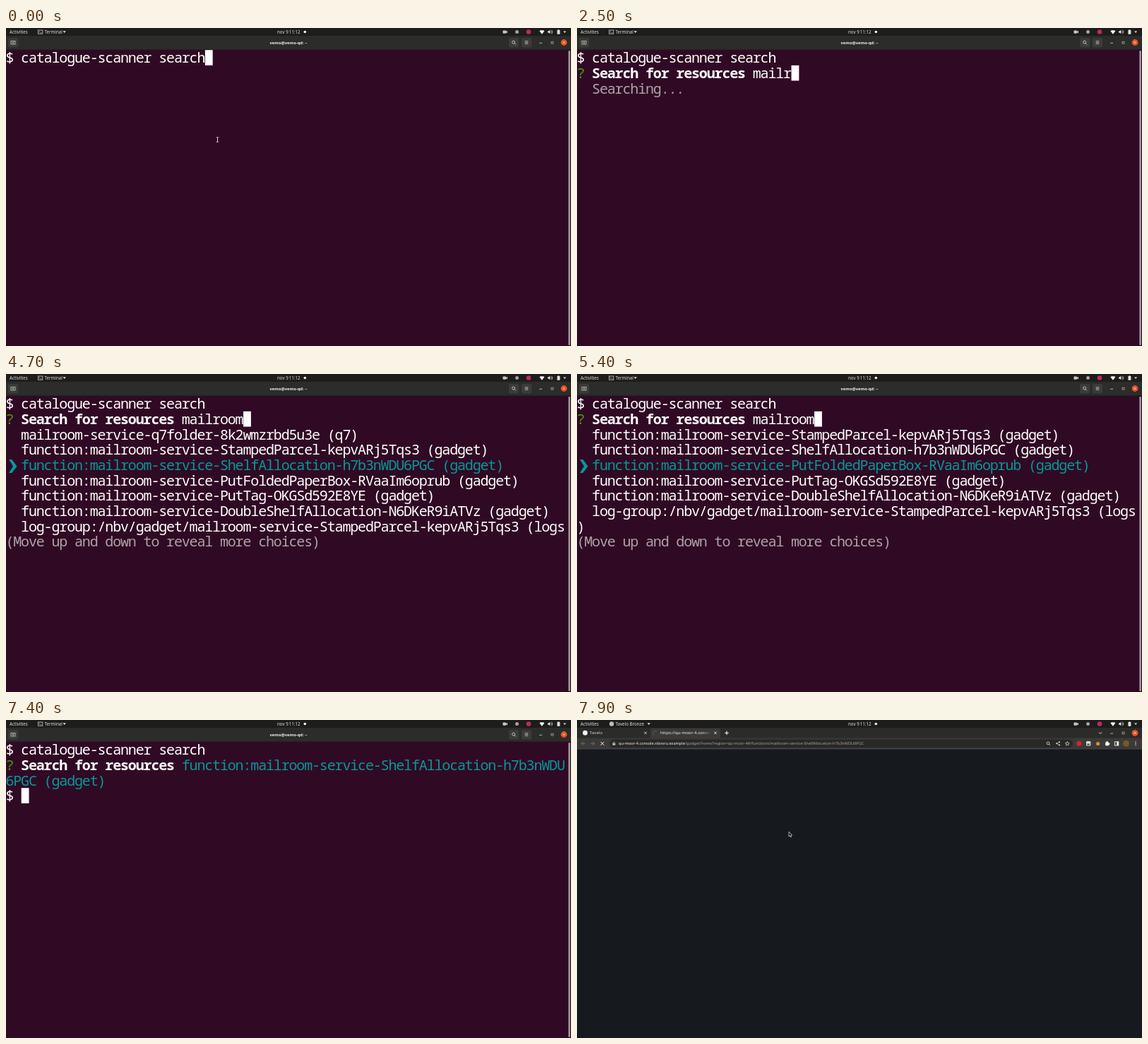
Write an HTML page with a canvas that moves like this. It is 800x450 px and loops after 8 s.

```html
<!DOCTYPE html>
<html lang="en">
<head>
<meta charset="utf-8">
<title>Terminal search</title>
<style>
html, body { margin: 0; width: 100%; height: 100%; overflow: hidden; background: #300a24; }
canvas { display: block; width: 800px; height: 450px; }
</style>
</head>
<body>
<canvas id="stage" width="800" height="450"></canvas>
<script>
const ctx = document.getElementById('stage').getContext('2d');
const LOOP = 8000, BLINK = 600, BROWSER_AT = 7600;
const CELL = 10.84, ROW = 21.67, TOP = 31.2, COLS = 73, PAGE = 7;
const WHITE = '#ffffff', DIM = '#aca2a8', CYAN = '#06989a', GREEN = '#4e9a06', ICON = '#dededc';
const SANS = '"Noto Sans", "Open Sans", sans-serif';
const MONO = '"Noto Sans Mono", "DejaVu Sans Mono", monospace';

const COMMAND = 'catalogue-scanner search';
const QUERY = 'mailroom';
const TYPED_AT = [1800, 1900, 2100, 2300, 2500, 2600, 2700, 2800];
const MOVES = [[4100, 1], [4700, 2], [5300, 3], [6000, 2]];
const KEYS = [0, 100, ...TYPED_AT, ...MOVES.map(m => m[0]), 7400];
const PICKED = 'mailroom-service-ShelfAllocation-h7b3nWDU6PGC';
const RESULTS = [
  'mailroom-service-q7folder-8k2wmzrbd5u3e (q7)',
  'function:mailroom-service-StampedParcel-kepvARj5Tqs3 (gadget)',
  `function:${PICKED} (gadget)`,
  'function:mailroom-service-PutFoldedPaperBox-RVaaIm6oprub (gadget)',
  'function:mailroom-service-PutTag-OKGSd592E8YE (gadget)',
  'function:mailroom-service-DoubleShelfAllocation-N6DKeR9iATVz (gadget)',
  'log-group:/nbv/gadget/mailroom-service-StampedParcel-kepvARj5Tqs3 (logs)'
];
const HOST = 'qu-moor-4.console.nbvoru.example';
const PATH = `/gadget/home?region=qu-moor-4#/functions/${PICKED}`;

// Drawing helpers
function rect(x, y, w, h, color, radius = 0) {
  ctx.fillStyle = color;
  ctx.beginPath();
  ctx.roundRect(x, y, w, h, radius);
  ctx.fill();
}

function dot(x, y, r, color) {
  ctx.fillStyle = color;
  ctx.beginPath();
  ctx.arc(x, y, r, 0, Math.PI * 2);
  ctx.fill();
}

function ring(x, y, r, color, width = 0.9, from = 0, to = Math.PI * 2) {
  ctx.strokeStyle = color;
  ctx.lineWidth = width;
  ctx.beginPath();
  ctx.arc(x, y, r, from, to);
  ctx.stroke();
}

function trace(points) {
  ctx.beginPath();
  for (let i = 0; i < points.length; i += 2) ctx.lineTo(points[i], points[i + 1]);
}

function line(color, width, ...points) {
  ctx.strokeStyle = color;
  ctx.lineWidth = width;
  trace(points);
  ctx.stroke();
}

function shape(color, ...points) {
  ctx.fillStyle = color;
  trace(points);
  ctx.fill();
}

function cross(x, y, r, color, width = 1) {
  line(color, width, x - r, y - r, x + r, y + r);
  line(color, width, x - r, y + r, x + r, y - r);
}

function label(text, x, y, size, color = ICON, weight = 400, align = 'left') {
  ctx.font = `${weight} ${size}px ${SANS}`;
  ctx.fillStyle = color;
  ctx.textAlign = align;
  ctx.fillText(text, x, y);
  return ctx.measureText(text).width;
}

function cells(text, col, row, color = WHITE, weight = 400) {
  ctx.font = `${weight} 20px ${MONO}`;
  ctx.fillStyle = color;
  ctx.textAlign = 'center';
  [...text].forEach((ch, i) => ctx.fillText(ch, (col + i + 0.5) * CELL, TOP + row * ROW + 18));
}

function chevron(row) {
  const y = TOP + row * ROW;
  shape(CYAN, 4, y + 3, 8.4, y + 3, 15.5, y + 12.5, 8.4, y + 22, 4, y + 22, 10, y + 12.5);
}

// Desktop panel shared by both windows
function panel(app, inBrowser) {
  rect(0, 0, 800, 11, '#1d1d1b');
  label('Activities', 5, 7.9, 6.2);
  if (inBrowser) {
    dot(49, 5.5, 3.2, '#bcbcba');
  } else {
    ctx.strokeStyle = ICON;
    ctx.lineWidth = 0.7;
    ctx.strokeRect(45.5, 3, 6.3, 5.2);
    line(ICON, 0.7, 46.8, 4.4, 48, 5.4, 46.8, 6.4);
    line(ICON, 0.7, 48.7, 6.7, 50.3, 6.7);
  }
  const end = inBrowser ? 99.5 : 80.5;
  label(app, 54.5, 7.9, 6.2);
  shape(ICON, end, 4.3, end + 4.4, 4.3, end + 2.2, 7);
  label('nov 9', 384, 7.9, 6.2);
  label('11:12', 416.5, 7.9, 6.2, ICON, 400, 'right');
  dot(423.3, 5.5, 1.8, '#f5f5f5');

  rect(703.5, 3.5, 4.5, 4.2, '#cfc4c4', 0.7);
  shape('#cfc4c4', 708, 5, 710, 3.8, 710, 7.5, 708, 6.2);
  dot(723.5, 5.5, 2.5, '#aaa0a3');
  dot(740, 5.5, 3.3, '#b92a68');
  shape('#f2f2f2', 755.3, 4.2, 757, 3.2, 760.8, 3.2, 762.4, 4.2, 758.9, 8.7);
  shape('#f2f2f2', 767, 4.5, 768.5, 4.5, 770.3, 2.8, 770.3, 8.2, 768.5, 6.6, 767, 6.6);
  ring(770.5, 5.5, 1.8, ICON, 0.7, -1, 1);
  ring(770.5, 5.5, 3.3, ICON, 0.7, -1, 1);
  rect(781.6, 2.2, 1.6, 1, ICON);
  rect(780.4, 3, 4, 5.7, ICON, 0.5);
  shape(ICON, 789, 4.4, 793.2, 4.4, 791.1, 7);
}

function windowButtons(y) {
  line(ICON, 0.8, 755.2, y + 0.8, 759, y + 0.8);
  ctx.strokeStyle = '#b8b8b6';
  ctx.lineWidth = 0.7;
  ctx.strokeRect(772, y - 1.2, 3, 2.8);
  dot(790, y, 4.4, '#e95420');
  cross(790, y, 1.4, WHITE, 0.7);
}

function terminalFrame() {
  rect(0, 0, 800, 450, '#300a24');
  panel('Terminal', false);
  rect(0, 11, 800, 20, '#2c2c2a');
  rect(0, 30.2, 800, 0.8, '#22201f');
  for (const x of [3, 712, 730]) rect(x, 14, 14.2, 13.4, '#3b3b39', 2);
  ctx.strokeStyle = ICON;
  ctx.lineWidth = 0.7;
  ctx.strokeRect(7, 18.5, 6, 4.5);
  line(ICON, 0.7, 10, 19.5, 10, 22);
  line(ICON, 0.7, 8.7, 20.8, 11.3, 20.8);
  ring(718.6, 20.1, 2, ICON, 0.8);
  line(ICON, 0.9, 720, 21.6, 721.7, 23.3);
  for (const y of [18.7, 20.5, 22.3]) line(ICON, 0.7, 734.7, y, 739.3, y);
  label('vemo@vemo-qd: ~', 400, 22.8, 5.8, '#f0f0ee', 700, 'center');
  windowButtons(20.5);
  rect(796.4, 32, 2.4, 417, '#aaa2a5', 1.2);
}

function ibeam(x, y) {
  line('#17070f', 2, x, y - 3, x, y + 3);
  line('#eeeeee', 0.9, x, y - 3, x, y + 3);
  line('#eeeeee', 0.8, x - 1.7, y - 3.2, x + 1.7, y - 3.2);
  line('#eeeeee', 0.8, x - 1.7, y + 3.2, x + 1.7, y + 3.2);
}

function resultList(t) {
  const active = MOVES.reduce((at, [time, to]) => t >= time ? to : at, 0);
  const first = Math.max(0, active - 2);
  const lines = RESULTS.flatMap(text => {
    const full = '  ' + text;
    return full.length > COLS ? [full.slice(0, COLS), full.slice(COLS)] : [full];
  });
  lines.slice(first, first + PAGE).forEach((text, i) => {
    const chosen = first + i === active;
    cells(text, 0, i + 2, chosen ? CYAN : WHITE);
    if (chosen) chevron(i + 2);
  });
  cells('(Move up and down to reveal more choices)', 0, 9, DIM);
}

// Draws the session and returns the cursor cell
function session(t) {
  cells('$ ' + COMMAND, 0, 0);
  if (t < 100) return [2 + COMMAND.length, 0];
  if (t < 400) return [0, 1];

  cells('?', 0, 1, GREEN);
  cells('Search for resources', 2, 1, WHITE, 700);
  if (t >= 7400) {
    const answer = RESULTS[2], room = COLS - 23;
    cells(answer.slice(0, room), 23, 1, CYAN);
    cells(answer.slice(room), 0, 2, CYAN);
    cells('$', 0, 3);
    return [2, 3];
  }
  if (t < 1800) {
    const hint = '(Use arrow keys or type to search)';
    cells(hint, 23, 1, DIM);
    cells('Start typing to search', 2, 2, CYAN);
    chevron(2);
    return [23 + hint.length, 1];
  }
  const typed = QUERY.slice(0, TYPED_AT.filter(at => t >= at).length);
  cells(typed, 23, 1);
  if (t < 3100) cells('Searching...', 2, 2, DIM);
  else resultList(t);
  return [23 + typed.length, 1];
}

function terminal(t) {
  terminalFrame();
  const [col, row] = session(t);
  const lastKey = Math.max(...KEYS.filter(k => k <= t));
  if (Math.floor((t - lastKey) / BLINK) % 2 === 0) {
    rect(col * CELL, TOP + row * ROW, CELL, ROW, WHITE);
  }
  if (t < 100) ibeam(299.5, 158);
}

function tabs(t) {
  rect(0, 11, 800, 15, '#2b2b29');
  rect(104, 11.8, 99, 15, '#3b3a38', 3);
  dot(11.5, 18.2, 3.4, '#f1f1f1');
  label('Tavelo', 18, 20.4, 6.1, '#d5d5d3');
  cross(97, 18.3, 1.7, ICON, 0.9);
  const spin = (t - BROWSER_AT) / 160;
  ring(110.5, 18.3, 2.8, '#626260', 0.8, spin, spin + 4);
  ctx.save();
  ctx.beginPath();
  ctx.rect(117, 12, 72.5, 13);
  ctx.clip();
  const fade = ctx.createLinearGradient(178, 0, 190, 0);
  fade.addColorStop(0, '#f0f0ee');
  fade.addColorStop(1, '#3b3a38');
  label('https://' + HOST, 118, 20.4, 6.1, fade);
  ctx.restore();
  cross(196, 18.3, 1.7, '#f0f0ee', 0.9);
  line(WHITE, 1, 209.3, 18.3, 214.7, 18.3);
  line(WHITE, 1, 212, 15.6, 212, 21);
  line(ICON, 0.9, 738.8, 17.4, 741, 19.4, 743.2, 17.4);
  windowButtons(18.3);
}

function toolbar() {
  rect(0, 25.5, 800, 15.7, '#3b3a38');
  rect(0, 40.6, 800, 0.6, '#4b4a48');
  for (const [x, d] of [[9, -1], [22, 1]]) {
    line('#777674', 0.9, x - 2.6, 33.3, x + 2.6, 33.3);
    line('#777674', 0.9, x, 30.7, x + d * 2.6, 33.3, x, 35.9);
  }
  cross(35.8, 33.3, 2.4, '#f0f0ee', 1);
  rect(46, 27.6, 656, 11.5, '#292827', 5.7);
  rect(50.3, 32.5, 4, 3.2, '#b9b9b7', 0.5);
  ring(52.3, 32.4, 1.2, '#b9b9b7', 0.7, Math.PI, 0);
  const hostWidth = label(HOST, 59, 35.4, 5.6, '#f2f2f0');
  label(PATH, 59 + hostWidth, 35.4, 5.6, '#a2a2a0');

  ring(667, 32.8, 1.9, ICON, 0.8);
  line(ICON, 0.9, 668.4, 34.2, 670, 36);
  line(ICON, 0.7, 683, 31.2, 679.2, 33.3, 683, 35.5);
  for (const [x, y] of [[683, 31.2], [679.2, 33.3], [683, 35.5]]) dot(x, y, 1, ICON);
  const star = Array.from({ length: 11 }, (_, i) => {
    const a = i * Math.PI / 5 - Math.PI / 2, r = i % 2 ? 1.4 : 3.1;
    return [694.2 + r * Math.cos(a), 33.5 + r * Math.sin(a)];
  }).flat();
  line(ICON, 0.7, ...star);

  dot(710.7, 33.3, 3.5, '#d8232e');
  rect(721, 30, 6.3, 6.5, '#dcdcda', 1);
  rect(722.2, 33.6, 3.9, 1.8, '#444342');
  dot(737.6, 33.5, 2.6, '#d98b3b');
  rect(748.1, 31.5, 4.9, 4.8, '#f2f2f0', 0.5);
  dot(750.6, 31.2, 1.2, '#f2f2f0');
  dot(753.2, 33.8, 1.2, '#f2f2f0');
  ctx.strokeStyle = '#f2f2f0';
  ctx.lineWidth = 0.9;
  ctx.strokeRect(761.4, 30.8, 5.4, 5.2);
  rect(764.2, 30.8, 2.6, 5.2, '#f2f2f0');
  dot(777.5, 33.3, 4.5, '#7a5822');
  for (const y of [31, 33.3, 35.6]) dot(791, y, 0.75, ICON);
}

function browser(t) {
  rect(0, 0, 800, 450, '#16191d');
  panel('Tavelo Bronze', true);
  tabs(t);
  toolbar();
  const arrow = [300, 158, 300, 165, 301.6, 163.6, 302.6, 165.8, 303.6, 165.3, 302.7, 163.2, 304.6, 163, 300, 158];
  shape('#111111', ...arrow);
  line('#e8e8e8', 0.7, ...arrow);
}

function frame(now) {
  const t = now % LOOP;
  if (t < BROWSER_AT) terminal(t);
  else browser(t);
}

const start = performance.now();
function tick() {
  frame(performance.now() - start);
  requestAnimationFrame(tick);
}
tick();
</script>
</body>
</html>
```
